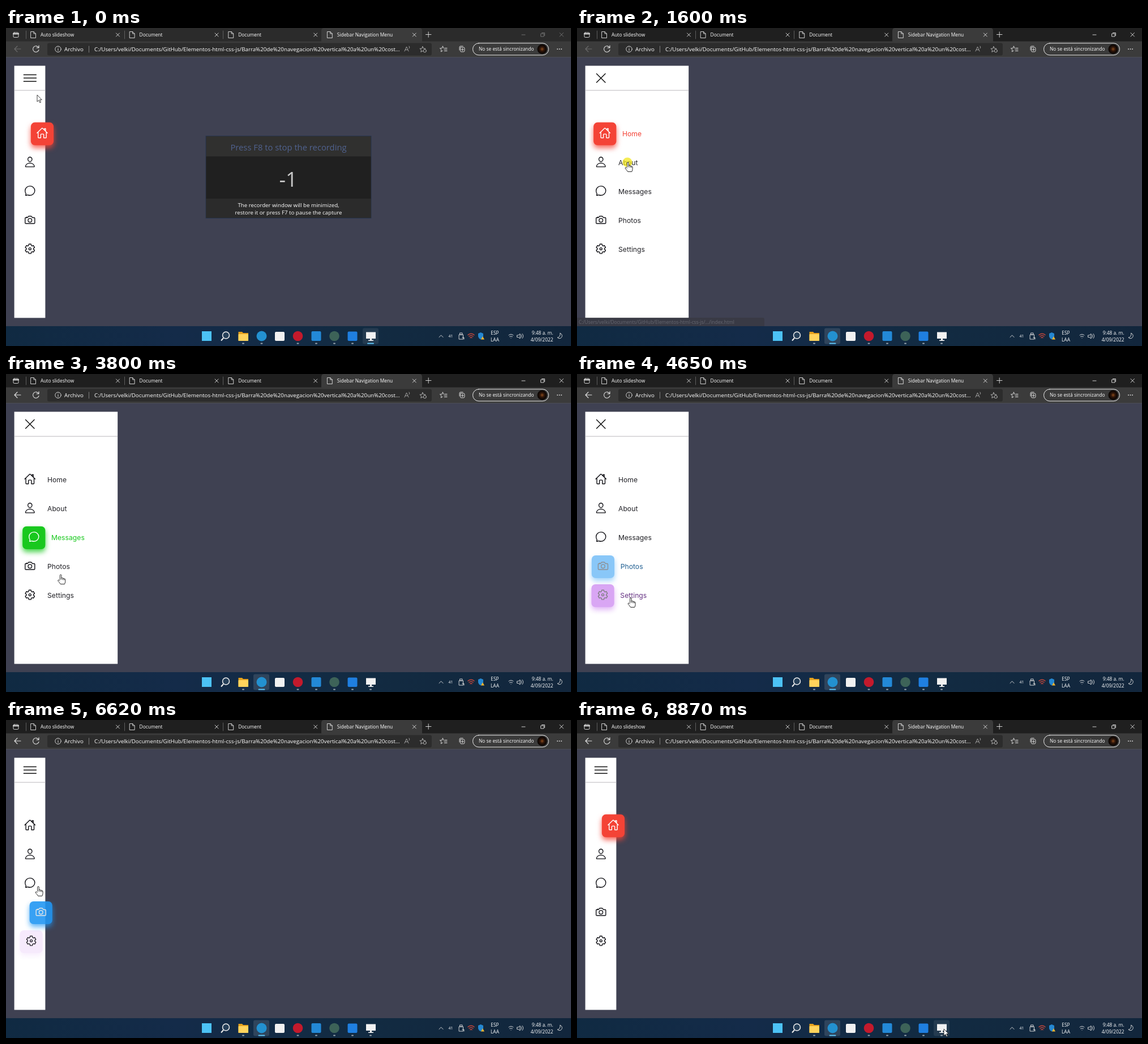
An HTML page for the animation above (9120 ms loop, 998 px wide and 561 px high).

```html
<!DOCTYPE html>
<html lang="es">
<head>
<meta charset="utf-8">
<title>Sidebar Navigation Menu</title>
<style>
html, body { margin: 0; width: 100%; height: 100%; overflow: hidden; background: #3f4152; }
svg { display: block; width: 100vw; height: 100vh; }
text { font-family: "Open Sans", sans-serif; font-size: 8.4px; fill: #fff; white-space: pre; }
.url { font-size: 9.75px; }
.label { font-family: Inter, sans-serif; font-size: 12.2px; }
.mid { text-anchor: middle; }
.line { fill: none; stroke: #e4e4e4; stroke-width: .9; stroke-linecap: round; stroke-linejoin: round; }
.icon { fill: none; stroke-width: 34; stroke-linecap: round; stroke-linejoin: round; }
.bar { stroke: #111; stroke-width: 1.5; }
</style>
</head>
<body>
<svg viewBox="0 0 998 561" preserveAspectRatio="none">
  <defs>
    <linearGradient id="sky">
      <stop offset="0" stop-color="#102a42"/><stop offset=".3" stop-color="#142b49"/>
      <stop offset=".62" stop-color="#122b42"/><stop offset="1" stop-color="#12263c"/>
    </linearGradient>
    <radialGradient id="photo">
      <stop offset="0" stop-color="#8a4a1c"/><stop offset=".45" stop-color="#2b1409"/><stop offset="1" stop-color="#050303"/>
    </radialGradient>
    <path id="star" d="M0-4.800l1.500 3.300 3.600.4-2.700 2.400.8 3.500-3.200-1.800-3.200 1.800.8-3.500-2.700-2.400 3.600-.4z"/>
  </defs>
  <rect width="998" height="561" fill="#3f4152"/>

  <rect id="strip" width="998" height="25"/>
  <path d="M557 25V5q0-5 5-5H730q5 0 5 5V25z" fill="#3b3b3b"/>
  <rect y="23.5" width="998" height="28" fill="#3b3b3b"/>
  <path d="M0 51.5H998" stroke="#54565f" stroke-width=".7"/>
  <rect x="73" y="26.5" width="679" height="22" rx="3" fill="#2c2c2c"/>
  <g id="tabs"></g>
  <g class="line">
    <rect x="13" y="8" width="9" height="8.5" rx="1.5"/><path d="M13 10.2h9" stroke-width="2"/>
    <path d="M35.5 5v14M209.5 5v14M383.5 5v14" stroke="#666"/>
    <path d="M741.500 11.500h9.500M746.200 6.800v9.500"/>
    <path id="caps" d="M911 12h6M945 10h5v5h-5zM946.500 8.500h5v5M978 8.500l6.500 6.500M984.500 8.500l-6.500 6.500"/>
    <path id="back" d="M26 37H15l5-5M15 37l5 5" stroke-width="1.1"/>
    <path d="M57.500 34.500a5.300 5.300 0 1 0 .5 4M58 31v4h-4" stroke-width="1.100"/>
    <circle cx="92" cy="37.300" r="5.200"/><path d="M92 36.500v3.500M92 34.500v.1"/>
    <path d="M146.500 32v11" stroke="#888"/>
    <path d="M704 41l3.500-8 3.500 8M705.500 38.500h4M712 32q2 2 0 4" stroke="#aaa"/>
    <use href="#star" x="736" y="37.500" stroke="#bbb"/>
    <circle cx="739.800" cy="40.300" r="2.600" fill="#2c2c2c" stroke="#bbb"/>
    <use href="#star" x="771.500" y="37"/>
    <path d="M774 38h5M773 40.500h5M775.500 35.500h3" stroke="#3b3b3b" stroke-width="3"/>
    <path d="M775 35.500h4M774 38h5M774.500 40.500h4.500"/>
    <path d="M801 39v-5q0-2 2-2h4M803 34h5q2 0 2 2v4q0 2-2 2h-4q-1.500 0-1.500-2zM804 38h4.500M806.200 35.700v4.600"/>
    <rect x="824.500" y="26.800" width="134" height="21" rx="10.500" stroke="#fff"/>
    <path d="M974 37.200h.1M977.500 37.200h.1M981 37.200h.1" stroke-width="1.700"/>
  </g>
  <circle cx="947" cy="37.200" r="8.500" fill="url(#photo)"/>
  <text x="103" y="40.700" class="url">Archivo</text>
  <text x="156" y="40.700" class="url">C:/Users/velki/Documents/GitHub/Elementos-html-css-js/Barra%20de%20navegacion%20vertical%20a%20un%20cost...</text>
  <text x="835" y="40.300">No se está sincronizando</text>

  <rect id="side" x="14.600" y="66.600" height="444.800" fill="#fff"/>
  <path id="rule" stroke="#b9b7bb"/>
  <g id="menu"></g>
  <g class="bar"><path id="top" d="M-11.500 0h23"/><path id="center" d="M31 88.300h23"/><path id="bottom" d="M-11.500 0h23"/></g>

  <g id="status">
    <path d="M0 511H328q3 0 3 3V526H0z" fill="#35363b"/>
    <text x="3" y="521.500" style="fill:#85868c">C:/Users/velki/Documents/GitHub/Elementos-html-css-js/.../index.html</text>
  </g>

  <g id="dialog" class="mid">
    <rect x="353" y="190.500" width="292" height="145" fill="#30302f" stroke="#24344f" stroke-width=".8"/>
    <rect x="353.500" y="226.500" width="291" height="74.500" fill="#202020"/>
    <rect x="353.500" y="301" width="291" height="34" fill="#2b2b2b"/>
    <text x="499" y="215.500" style="font-size:14.800px;fill:#50628f">Press F8 to stop the recording</text>
    <text x="498.500" y="279.500" style="font-size:36px;fill:#c8c8c8">-1</text>
    <text x="499" y="315.500" style="font-size:9.700px">The recorder window will be minimized,</text>
    <text x="499" y="328.500" style="font-size:9.700px">restore it or press F7 to pause the capture</text>
  </g>

  <rect y="526" width="998" height="35" fill="url(#sky)"/>
  <rect id="hotEdge" x="437" y="529.500" width="28" height="28" rx="3" fill="#fff" opacity=".12"/>
  <rect id="hotRec" x="630" y="529.500" width="28" height="28" rx="3" fill="#fff" opacity=".08"/>
  <rect x="346" y="535" width="17" height="17" fill="#4cc2f5"/>
  <circle cx="388.500" cy="542" r="6" fill="#26405a" stroke="#eee" stroke-width="1.500"/><path d="M384 547l-4 4.500" stroke="#eee" stroke-width="2"/>
  <path d="M410.500 536h6.500l2 2h9v14h-17.500z" fill="#e5a11d"/><rect x="410.500" y="540" width="17.500" height="12" rx="1" fill="#ffd35c"/>
  <circle cx="451.500" cy="543.500" r="9" fill="#2391d0"/>
  <rect x="475" y="536" width="17" height="16" rx="2" fill="#f1f1f1"/>
  <circle cx="515.500" cy="543.500" r="8.800" fill="#c31a2c"/>
  <rect x="539.500" y="535" width="17" height="17" rx="2" fill="#2389d7"/>
  <circle cx="580" cy="543.500" r="8.800" fill="#3d6358"/>
  <rect x="603.500" y="535.500" width="17" height="16.500" rx="2" fill="#1f7fe0"/>
  <path d="M636 536.500h17v11.500h-7v2.500h3v1.500h-9v-1.500h3v-2.500h-7z" fill="#f2f2f2"/>
  <g id="dots" fill="#9aa5af"></g>
  <g class="line">
    <path d="M765 545.500l3.500-3.500 3.500 3.500"/>
    <path d="M802 538h4v3h-4zM800.500 541h7v8h-7zM806 546h3v3"/>
    <path d="M816 541.500q5.500-4.500 11 0M818 544q3.500-3 7 0M820 546.500q1.500-1.500 3 0" stroke="#c4473b" stroke-width="1.500"/>
    <path d="M888 542q4-3.500 8 0M889.500 544.500q2.500-2 5 0M892 547v.1"/>
    <path d="M903 542h2l3-2.500v8.500l-3-2.500h-2zM910 541q2 2.500 0 5M912 539.500q3.500 4 0 8"/>
    <path d="M979 538.500a4.700 4.700 0 1 1-5 7.500q5 0 5-7.500z"/>
  </g>
  <path d="M834 539l4.500-2 4.500 2v5q-1 4-4.500 5.500q-3.500-1.500-4.500-5.500z" fill="#2587d0"/><path d="M842 544l3 5.500h-6z" fill="#f4b52e"/>
  <text x="781.500" y="546" style="font-size:7px">41</text>
  <g class="mid"><text x="863.500" y="541">ESP</text><text x="863.500" y="553">LAA</text></g>
  <g text-anchor="end"><text x="966.500" y="541">9:48 a. m.</text><text x="966.500" y="552.500">4/09/2022</text></g>

  <g id="cursor">
    <circle id="spot" cx="-1" cy="0" r="8.500" fill="#f2e51c" opacity=".75"/>
    <path id="arrow" d="M0 0V12l2.800-2.500 2 4.300 1.800-.8-2-4.300H8.300z" fill="#fff" stroke="#111" stroke-width=".8"/>
    <path id="hand" d="M-1.300 8.700V1.200q0-1.500 1.300-1.500t1.300 1.500V5.500q2.300-.6 2.600.7 2-.4 2.300.8 1.900-.2 1.900 1.500v3q0 2.500-1.300 5H-.4q-1.400-2.700-4-5.200-1.200-1.800.3-2.300 1.300-.2 2.800 1.700M1.300 5.500v3.200M3.900 6.200v3M6.200 7v2.500" fill="#fff" stroke="#111" stroke-width=".9" stroke-linejoin="round"/>
  </g>
</svg>
<script>
const LOOP = 9120, DUR = 450;
const $ = id => document.getElementById(id);
const set = (el, attrs) => { for (const k in attrs) el.setAttribute(k, attrs[k]); };
const add = (parent, tag, attrs = {}, text = '') => {
  const el = document.createElementNS('http://www.w3.org/2000/svg', tag);
  set(el, attrs);
  el.textContent = text;
  return parent.appendChild(el);
};
const clamp = v => Math.min(1, Math.max(0, v));
const ramp = (t, a, b) => clamp((t - a) / (b - a));
const mix = (a, b, p) => a + (b - a) * p;
const rgb = (a, b, p) => `rgb(${a.map((v, i) => Math.round(mix(v, b[i], p)))})`;

// CSS "ease": cubic-bezier(.25, .1, .25, 1)
function ease(x) {
  if (x <= 0 || x >= 1) return clamp(x);
  const curve = (u, a, b) => 3 * u * (1 - u) ** 2 * a + 3 * u * u * (1 - u) * b + u ** 3;
  let lo = 0, hi = 1;
  for (let i = 0; i < 20; i++) {
    const u = (lo + hi) / 2;
    if (curve(u, .25, .25) < x) lo = u; else hi = u;
  }
  return curve(lo, .1, 1);
}
const since = (t, start) => ease((t - start) / DUR);

function gear() {
  const teeth = [[-31, 152], [-21, 160], [-13, 208], [13, 208], [21, 160]];
  const pts = [];
  for (let k = 0; k < 6; k++) for (const [deg, r] of teeth) {
    const a = (k * 60 + deg) * Math.PI / 180;
    pts.push(`${(256 + r * Math.sin(a)).toFixed(1)} ${(256 - r * Math.cos(a)).toFixed(1)}`);
  }
  return `M${pts.join('L')}z`;
}
const ring = (cy, r) => `M${256 - r} ${cy}a${r} ${r} 0 1 0 ${2 * r} 0a${r} ${r} 0 1 0 ${-2 * r} 0`;

const items = [
  ['Home', [244, 67, 54], 'M80 212V448a16 16 0 0 0 16 16h96V328a24 24 0 0 1 24-24h80a24 24 0 0 1 24 24V464h96a16 16 0 0 0 16-16V212M480 256L267 52c-5-5-17-5-22 0L32 256M400 179V64h-48v69'],
  ['About', [255, 161, 23], 'M344 144c-4 53-44 96-88 96s-84-43-88-96c-4-55 35-96 88-96s92 42 88 96zM256 304c-87 0-175 48-192 139-2 11 5 21 16 21h352c11 0 18-10 16-21C431 352 343 304 256 304z'],
  ['Messages', [25, 200, 30], 'M87 380c2-5-1-11-4-15A184 184 0 0 1 48 249C48 138 140 48 256 48s208 84 208 196-92 204-208 204c-26 0-56-7-72-12-18-6-30-10-47-4-15 5-43 15-61 19-5 1-9-3-7-8z'],
  ['Photos', [33, 150, 243], 'M351 149l-27-42q-9-11-22-11h-92q-13 0-22 11l-27 42q-9 11-21 11H80a32 32 0 0 0-32 32V384a32 32 0 0 0 32 32h352a32 32 0 0 0 32-32V192a32 32 0 0 0-32-32h-59q-13 0-22-11zM124 158v-22h-24v22' + ring(272, 80)],
  ['Settings', [177, 69, 233], gear() + ring(256, 48)]
].map(([name, color, path], i) => {
  const g = add($('menu'), 'g'), y = 166.6 + 51.1 * i;
  const tile = add(g, 'rect', { x: 22.2, y, width: 40.2, height: 40.2, rx: 7, fill: rgb(color, color, 0),
    style: `filter:drop-shadow(0 5px 5px rgba(${color},.8))` });
  const icon = add(g, 'path', { class: 'icon', d: path, transform: `translate(31.800 ${y + 8.1}) scale(.041)` });
  const label = add(g, 'text', { class: 'label', x: 73, y: y + 24.2 }, name);
  return { color, g, tile, icon, label };
});

['Auto slideshow', 'Document', 'Document', 'Sidebar Navigation Menu'].forEach((name, i) => {
  const x = 44 + i * 174.6;
  add($('tabs'), 'path', { class: 'line', d: `M${x} 6.500h5l3.500 3.500v7.500h-8.500zM${x + 5} 6.500v3.500h3.500` });
  add($('tabs'), 'text', { x: x + 17, y: 14.8 }, name);
  add($('tabs'), 'path', { class: 'line', d: `M${x + 150.5} 9l6 6m0-6l-6 6` });
});
const dots = {};
for (const x of [419, 451.5, 515.5, 548, 580, 612, 644]) dots[x] = add($('dots'), 'rect', { y: 555.5, height: 2, rx: 1 });

// [time, item]; item -1 toggles the sidebar
const OPEN = 660, CLOSE = 5500;
const clicks = [[OPEN, -1], [1670, 1], [2350, 2], [4130, 3], [4525, 4], [CLOSE, -1], [6345, 3], [6730, 2], [6980, 1], [7500, 0]];
const picks = clicks.filter(c => c[1] >= 0);

const track = [
  [50, 55, 118], [450, 41, 88], [850, 41, 88], [1400, 90, 237], [1750, 90, 237], [2150, 98, 290],
  [3050, 98, 290], [3450, 110, 425], [3950, 93, 335], [4200, 93, 335], [4450, 95, 395],
  [5000, 95, 395], [5250, 41, 88], [5540, 41, 88], [5750, 25, 242], [6080, 42, 375], [6260, 55, 335],
  [6400, 55, 335], [6620, 57, 294], [6740, 57, 288], [6900, 52, 238], [7250, 52, 238], [7430, 54, 187],
  [7550, 54, 187], [8150, 660, 546], [8350, 660, 546], [8450, 648, 545]
];
function pointer(t) {
  const i = track.findIndex(k => k[0] > t);
  if (i === 0) return track[0].slice(1);
  if (i < 0) return track[track.length - 1].slice(1);
  const [a, b] = [track[i - 1], track[i]], u = ramp(t, a[0], b[0]), p = u * u * (3 - 2 * u);
  return [mix(a[1], b[1], p), mix(a[2], b[2], p)];
}

function strength(i, t) {
  let p = i === 0 ? 1 : 0, active = 0;
  for (const [time, next] of picks) {
    const e = since(t, time);
    if (next === i) p += e;
    if (active === i) p -= e;
    active = next;
  }
  return clamp(p);
}

function draw(t) {
  const open = since(t, OPEN) - since(t, CLOSE);
  const focused = t >= 250;

  const width = mix(54.8, 182.6, open);
  set($('side'), { width });
  set($('rule'), { d: `M14.600 110H${14.6 + width}` });
  set($('top'), { transform: `translate(42.300 ${82.5 + 5.8 * open}) rotate(${45 * open})` });
  set($('bottom'), { transform: `translate(42.300 ${94.2 - 5.9 * open}) rotate(${-45 * open})` });
  set($('center'), { opacity: 1 - open });

  items.forEach((it, i) => {
    const p = strength(i, t);
    set(it.g, { transform: `translate(${p * mix(21.7, 7, open)} 0)` });
    set(it.tile, { opacity: p });
    set(it.icon, { stroke: rgb([15, 15, 20], [255, 255, 255], p) });
    it.label.style.fill = rgb([35, 35, 40], it.color, p);
    set(it.label, { opacity: open });
  });

  set($('strip'), { fill: focused ? '#1f1f1f' : '#2b2b2b' });
  set($('caps'), { stroke: focused ? '#e4e4e4' : '#777' });
  set($('back'), { stroke: t < 1700 ? '#6c6c6c' : '#e4e4e4' });
  set($('dialog'), { opacity: 1 - ramp(t, 50, 180) });
  set($('status'), { opacity: ramp(t, 1540, 1650) * (1 - ramp(t, 2300, 2450)) });

  set($('hotEdge'), { visibility: focused ? 'visible' : 'hidden' });
  set($('hotRec'), { visibility: !focused || t > 8100 ? 'visible' : 'hidden' });
  const front = focused ? '451.5' : '644';
  for (const x in dots) {
    const w = x === front ? 12 : 4;
    set(dots[x], { x: x - w / 2, width: w, fill: x === front ? '#5ec4f5' : '#9aa5af' });
  }

  const [x, y] = pointer(t);
  const hand = t > 330 && t < 7620;
  set($('cursor'), { transform: `translate(${x} ${y})` });
  set($('hand'), { visibility: hand ? 'visible' : 'hidden' });
  set($('arrow'), { visibility: hand ? 'hidden' : 'visible' });
  set($('spot'), { visibility: clicks.some(c => t >= c[0] - 80 && t < c[0] + 10) ? 'visible' : 'hidden' });
}

const start = performance.now();
function tick(now) {
  draw(Math.max(0, now - start) % LOOP);
  requestAnimationFrame(tick);
}
draw(0);
requestAnimationFrame(tick);
</script>
</body>
</html>
```
